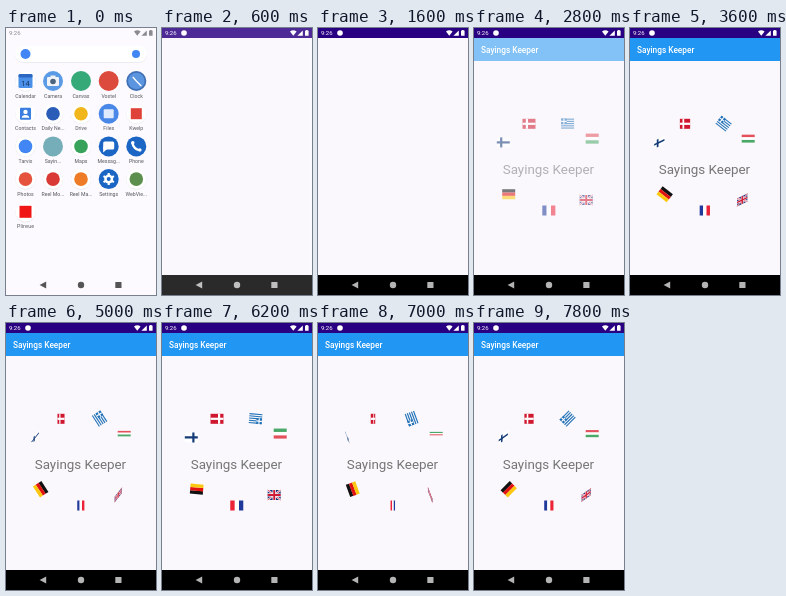
An HTML page that plays this animation: 150x267 px, repeating every 8 s.

```html
<!DOCTYPE html>
<html lang="en">
<head>
<meta charset="utf-8">
<title>Sayings Keeper</title>
<style>
  html, body { margin: 0; width: 100%; height: 100%; overflow: hidden; background: #fff; }
  svg { display: block; width: 100vw; height: 100vh; }
  text { font-family: Roboto, Arial, sans-serif; }
</style>
</head>
<body>
<svg id="stage" viewBox="0 0 150 267" preserveAspectRatio="none"></svg>
<script>
const LOOP = 8000, STEP = 200;
const OPEN = [100, 800], FADE = [2250, 3250];
// Time in ms and angle in degrees: a quick spin that slows down
const SPIN = [[3400, 0], [3600, 38], [5000, 417], [6200, 545], [7800, 675]];

const rect = (x, y, w, h, fill, rx = 0) =>
  `<rect x="${x}" y="${y}" width="${w}" height="${h}" rx="${rx}" fill="${fill}"/>`;
const disc = (r, fill, x = 0, y = 0) => `<circle cx="${x}" cy="${y}" r="${r}" fill="${fill}"/>`;
const path = (d, fill) => `<path d="${d}" fill="${fill}"/>`;
const line = (d, stroke, w) => `<path d="${d}" fill="none" stroke="${stroke}" stroke-width="${w}"/>`;
const text = (x, y, size, fill, str, extra = '') =>
  `<text x="${x}" y="${y}" font-size="${size}" fill="${fill}" ${extra}>${str}</text>`;
const centered = 'text-anchor="middle"';

// System bars
const status = fill =>
  text(3, 7.2, 6, fill, '9:26') +
  path('M128 3.4Q131.3 1 134.6 3.4L131.3 7.8Z', fill) +
  path('M140.8 2.4V7.8H135.4Z', fill) +
  rect(143, 2.6, 3.6, 5.2, fill, .5) + rect(144, 2, 1.6, 1, fill);
const nav = fill =>
  path('M33.6 257L40.2 253.4V260.6Z', fill) + disc(3.2, fill, 75, 257) +
  rect(109.3, 253.9, 6.2, 6.2, fill, .4);

// Launcher icons
const plate = disc(10.2, '#e6e7ec', 0, .4) + disc(10, '#fff');
const mark = fill => plate + disc(6.8, fill);
const blue = disc(10, '#1b66c4');
const gear = line('M0 -6V6M-5.2 -3L5.2 3M-5.2 3L5.2 -3', '#fff', 2.2) +
  disc(4.5, '#fff') + disc(2, '#1b66c4');
const apps = [
  ['Calendar', plate + rect(-7, -7, 14, 14, '#4a8fe8', 1.5) + rect(-7, -7, 14, 3.5, '#2b66c0', 1.5) +
    text(0, 4.8, 7.5, '#16345f', '14', centered)],
  ['Camera', disc(10, '#5b9be6') + rect(-6, -4, 12, 9, '#f1f3f6', 1.3) +
    rect(-2.5, -5.5, 5, 2, '#f1f3f6') + disc(2.8, '#4b6580', 0, .5)],
  ['Canvas', disc(10, '#35a978')],
  ['Vostel', disc(10, '#dc4a3d')],
  ['Clock', disc(10, '#3f6fb5') + disc(8.3, '#5b94df') + line('M-3.5 -4L0 0L5 5', '#fff', 1.3)],
  ['Contacts', plate + rect(-5.5, -6, 11, 12, '#3c7ee0', 1) + disc(2.2, '#fff', 0, -1.8) +
    path('M-3.8 4Q-3.5 1.2 0 1.2T3.8 4Z', '#fff')],
  ['Daily Ne...', mark('#2a5cb8')],
  ['Drive', mark('#f1b61c')],
  ['Files', disc(10, '#4a88e8') + rect(-5, -4.5, 10, 9, '#dfeafc', 1)],
  ['Kwelp', plate + rect(-5.5, -5.5, 11, 11, '#df4238')],
  ['Tarvix', mark('#4285f4')],
  ['Sayin...', disc(10, '#75adb8')],
  ['Maps', mark('#37a25a')],
  ['Messag...', blue + rect(-5.5, -5, 11, 8, '#fff', 1.5) + path('M-5.5 0V6L-1 2Z', '#fff')],
  ['Phone', blue + line('M-4 -4Q-3 3 4 4', '#fff', 2.4) +
    disc(1.7, '#fff', -3.5, -3.6) + disc(1.7, '#fff', 3.6, 3.5)],
  ['Photos', mark('#e5533d')],
  ['Reel Mo...', mark('#d93a35')],
  ['Reel Ma...', mark('#ee7b25')],
  ['Settings', blue + gear],
  ['WebVie...', mark('#5c8f4d')],
  ['Plinvue', plate + rect(-6, -6, 12, 12, '#f01616')]
];
const cols = [19.5, 47, 75, 102.7, 130.3];
const icons = apps.map(([name, art], i) => {
  const x = cols[i % 5], y = 53 + Math.floor(i / 5) * 32.7;
  return `<g transform="translate(${x} ${y})">${art}${text(0, 16.6, 5.2, '#55575c', name, centered)}</g>`;
}).join('');
const launcher = rect(0, 0, 150, 267, '#fdfaff') + status('#8b8b90') +
  rect(9, 18.4, 132, 16.4, '#e8e7ec', 8.2) + rect(9, 18, 132, 16, '#fff', 8) +
  disc(5, '#4285f4', 19.5, 26) + disc(4, '#4285f4', 130, 26) + icons + nav('#555');

// Flags, each 13 by 10 around its centre
const bands = colors => colors.map((c, i) => rect(-6.5, -5 + i * 10 / 3, 13, 3.4, c)).join('');
const cross = (field, ink) => rect(-6.5, -5, 13, 10, field) + rect(-3.2, -5, 2.2, 10, ink) +
  rect(-6.5, -1.1, 13, 2.2, ink);
const greek = rect(-6.5, -5, 13, 10, '#f4f6fa') +
  [0, 2, 4, 6, 8].map(i => rect(-6.5, -5 + i * 10 / 9, 13, 1.11, '#2472b8')).join('') +
  rect(-6.5, -5, 5.6, 5.6, '#2472b8') + line('M-3.7 -5V.6M-6.5 -2.2H-.9', '#fff', 1.1);
const diagonals = 'M-6.5 -5L6.5 5M-6.5 5L6.5 -5', upright = 'M0 -5V5M-6.5 0H6.5';
const british = rect(-6.5, -5, 13, 10, '#1d2f78') + line(diagonals, '#fff', 2) +
  line(diagonals, '#cf1b35', .7) + line(upright, '#fff', 3.3) + line(upright, '#cf1b35', 1.9);
const french = ['#20399b', '#fff', '#ec2438']
  .map((c, i) => rect(-6.5 + i * 13 / 3, -5, 4.4, 10, c)).join('');
const flags = [
  [55, 95.8, 'y', cross('#cf1830', '#fff')],
  [93.6, 95.6, 'z', greek],
  [118.2, 110.6, 'x', bands(['#e3515d', '#fff', '#4aa868'])],
  [29.3, 114.4, 'xy', cross('#fff', '#153a78')],
  [34.7, 166.2, 'z', bands(['#111', '#e01212', '#fbc80f'])],
  [74.8, 182.5, 'y', french],
  [112.2, 172, 'xy', british]
];

const pose = {
  x: (c, s) => [1, 0, 0, c],
  y: (c, s) => [c, 0, 0, 1],
  z: (c, s) => [c, s, -s, c],
  xy: (c, s) => [c, -s * s, 0, c]
};

const stage = document.getElementById('stage');
stage.innerHTML = launcher +
  `<defs><clipPath id="hole"><rect id="window"/></clipPath></defs>
  <g id="app"><g clip-path="url(#hole)">` +
  rect(0, 0, 150, 267, '#faf8fc') + '</g><g id="bars">' +
  rect(0, 0, 150, 10, '#2a0082') + rect(0, 247, 150, 20, '#000') +
  status('#fff') + disc(2.8, '#fff', 22, 5) + nav('#b4b4b4') + '</g><g id="content">' +
  rect(0, 10, 150, 23, '#2196f3') +
  text(28.7, 145.5, 13.4, '#757575', 'Sayings Keeper') +
  flags.map(f => `<g class="flag">${f[3]}</g>`).join('') + '</g>' +
  `<g id="title">${text(7, 24.8, 8.3, '#fff', 'Sayings Keeper', 'font-weight="500"')}</g></g>`;

const $ = id => document.getElementById(id);
const flagNodes = [...document.querySelectorAll('.flag')];
const clamp = v => Math.max(0, Math.min(1, v));
const part = (t, [from, to]) => clamp((t - from) / (to - from));
const mix = (a, b, p) => a + (b - a) * p;

function spinAngle(t) {
  let angle = 0;
  for (let i = 1; i < SPIN.length; i++) {
    const [t0, a0] = SPIN[i - 1], [t1, a1] = SPIN[i];
    if (t >= t0) angle = mix(a0, a1, part(t, [t0, t1]));
  }
  return angle * Math.PI / 180;
}

function draw(t) {
  // The window grows out of its launcher icon
  const open = part(t, OPEN), grow = 1 - (1 - open) ** 3;
  const box = { x: mix(37, 0, grow), y: mix(108, 0, grow),
    width: mix(20, 150, grow), height: mix(20, 267, grow), rx: mix(10, 0, grow) };
  for (const k in box) $('window').setAttribute(k, box[k]);
  $('app').setAttribute('opacity', clamp(open * 4));
  $('bars').setAttribute('opacity', clamp(open * 2 - .6));

  const fade = part(t, FADE);
  $('content').setAttribute('opacity', fade);
  $('title').setAttribute('opacity', clamp(fade * 2));

  const angle = spinAngle(t), c = Math.cos(angle), s = Math.sin(angle);
  flags.forEach(([x, y, axis], i) =>
    flagNodes[i].setAttribute('transform', `matrix(${[...pose[axis](c, s), x, y]})`));
}

const start = performance.now();
function tick() {
  const t = (performance.now() - start) % LOOP;
  draw(Math.floor(t / STEP) * STEP);
  requestAnimationFrame(tick);
}
tick();
</script>
</body>
</html>
```
